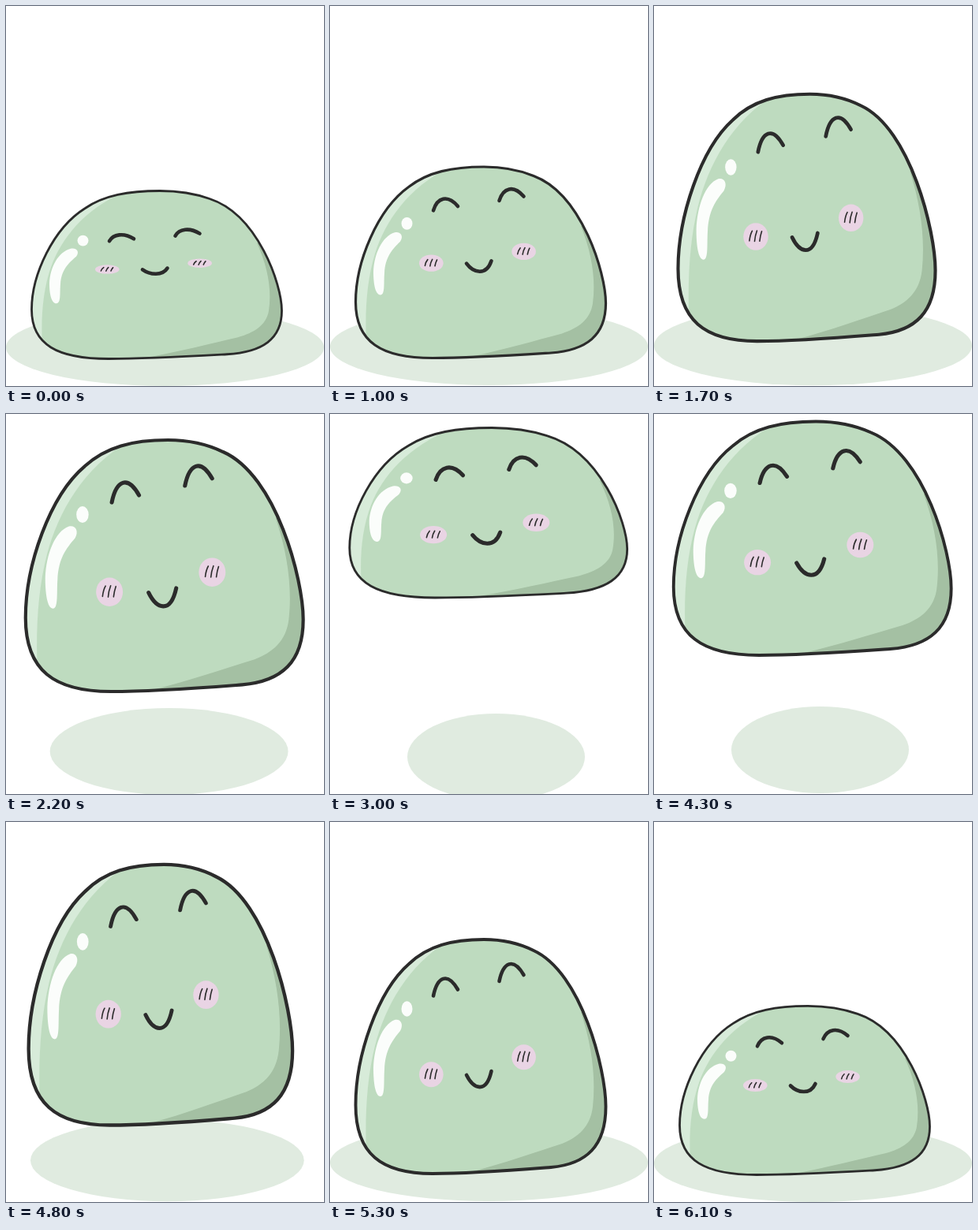
Recreate the animation shown at these times as an HTML page. Size 403 by 482 pixels, loop 6.2 s.

```html
<!DOCTYPE html>
<html lang="en">
<head>
<meta charset="utf-8">
<title>Bouncing blob</title>
<style>
  html, body { margin: 0; width: 100%; height: 100%; overflow: hidden; background: #fff; }
  svg { display: block; width: 403px; height: 482px; }
  path { vector-effect: non-scaling-stroke; }
  .line { fill: none; stroke: #2b2b2b; stroke-linecap: round; stroke-linejoin: round; }
</style>
</head>
<body>
<svg viewBox="0 0 403 482">
  <defs>
    <path id="shape" d="M195 0C155 0 124 8 100 31C60 66 32.5 148 32.5 210C32.5 272 65 297 130 297C180 297 235 292.5 280 289C325 285 349.5 262 349.5 212C349.5 165 319 42 258 14C238 4 218 0 195 0Z"/>
    <path id="eye" d="M131 -99.5C136 -124 149 -130 162 -107.5"/>
    <clipPath id="inside"><use href="#shape"/></clipPath>
    <g id="cheek">
      <ellipse cx="128.3" cy="0.2" rx="15.3" ry="16" fill="#e9d4e4"/>
      <path class="line" stroke-width="1.6" d="M123.8 -6.5Q121.2 -2 120.4 5.2M129.7 -6.8Q127.4 -1 126.8 5.8M135.6 -6Q133.8 -1 133 5.6"/>
    </g>
  </defs>
  <ellipse id="shadow" fill="#e0ebe0"/>
  <g id="body">
    <use href="#shape" fill="#bedbbf"/>
    <g clip-path="url(#inside)">
      <path fill="#d7ebd9" d="M152 0C98 33 70 85 57 135C47 175 44 220 46 275L0 275L0 0Z"/>
      <path fill="#a4c0a3" d="M318 92C332 135 337 175 333 212C330 238 314 251 294 259C260 270 220 284 178 295L178 320L380 320L380 92Z"/>
    </g>
    <path fill="#fbfdfb" d="M82 102C89 100 94 107 89 116C79 128 70 140 69 165C68 180 70 199 64 199C57 199 55 180 55 163C56 135 66 108 82 102Z"/>
    <ellipse fill="#fbfdfb" cx="97.5" cy="88" rx="7" ry="9.7"/>
    <use id="outline" class="line" href="#shape"/>
  </g>
  <g id="face">
    <use href="#cheek"/>
    <use href="#cheek" x="117.3" y="-22"/>
    <g id="strokes" class="line">
      <use href="#eye"/>
      <use href="#eye" x="83.5" y="-18.5"/>
      <path d="M173 1C182 19 198 25 204.5 -4"/>
    </g>
  </g>
</svg>
<script>
const LOOP = 6200, STEP = 100, GROUND = 447.5, HEIGHT = 297;
const el = id => document.getElementById(id);

// Key poses: ms, body top, body bottom, cheek line, face stretch, shadow height.
const poses = [
  [0, 234.5, 447.5, 334, .36, 433],      // squashed
  [700, 231.5, 447, 333, .49, 432.5],
  [1000, 204, 446.5, 326, .67, 432],     // stretching
  [1500, 145, 446, 314, 1, 432],         // leaves the ground
  [2200, 33, 352, 225.5, 1.14, 428],
  [3000, 17.5, 233, 153, .7, 435],       // highest
  [4300, 9.5, 306, 188, 1.01, 426],
  [4900, 67.5, 400, 257, 1.12, 430],
  [5300, 149, 446, 320, 1, 432],         // landed
  [6100, 233.3, 447.5, 334, .5, 433]
];

// Pose by index, wrapping round the loop.
function pose(i) {
  const n = poses.length, turn = Math.floor(i / n);
  const [ms, ...values] = poses[i - turn * n];
  return [ms + turn * LOOP, ...values];
}

// Smooth curve through the key poses.
function poseAt(t) {
  const i = poses.findLastIndex(p => p[0] <= t);
  const [a, b, c, d] = [-1, 0, 1, 2].map(k => pose(i + k));
  const span = c[0] - b[0], u = (t - b[0]) / span, w = 1 - u;
  return b.slice(1).map((v, k) => {
    k++;
    const m0 = (c[k] - a[k]) / (c[0] - a[0]);
    const m1 = (d[k] - b[k]) / (d[0] - b[0]);
    return v * (1 + 2 * u) * w * w + c[k] * u * u * (3 - 2 * u) + span * u * w * (m0 * w - m1 * u);
  });
}

function ramp(t, from, to) {
  const u = Math.min(1, Math.max(0, (t - from) / (to - from)));
  return u * u * (3 - 2 * u);
}

function set(id, attrs) {
  for (const name in attrs) el(id).setAttribute(name, attrs[name]);
}

function place(id, x, y, sx, sy) {
  set(id, { transform: `translate(${x} ${y}) scale(${sx} ${sy})` });
}

function draw(t) {
  const [top, low, faceY, faceScale, shadowY] = poseAt(t);
  const near = ramp(t, 1500, 2100) - ramp(t, 4500, 5100);
  const lift = ramp(t, 1900, 2450) - ramp(t, 4300, 5100);
  const zoom = 1 + .11 * near, dx = -11.3 * near;
  const stretch = (Math.min(low, GROUND) - top) / HEIGHT;

  place('body', dx, top, zoom, stretch);
  place('face', dx, faceY, zoom, faceScale);
  set('outline', { 'stroke-width': 3.9 * stretch });
  set('strokes', { 'stroke-width': 4.6 * zoom });
  set('shadow', { cx: 201.5 + 9 * lift, cy: shadowY, rx: 201.5 - 89 * lift, ry: 49 + 6 * near });
}

const start = performance.now();
function tick() {
  const t = (performance.now() - start) % LOOP;
  draw(Math.floor(t / STEP) * STEP);
  requestAnimationFrame(tick);
}
tick();
</script>
</body>
</html>
```
